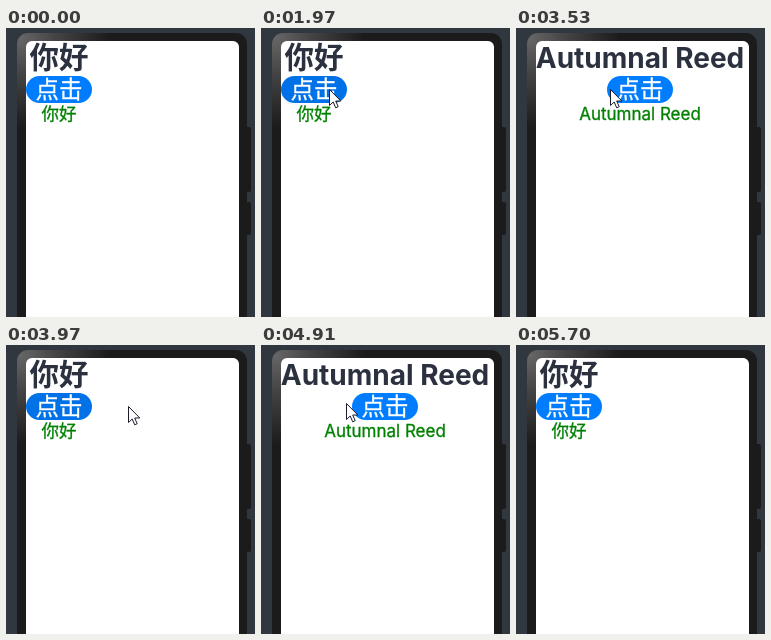
An HTML page that plays this animation: 249x289 px, repeating every 6.6 s.

```html
<!DOCTYPE html>
<html lang="zh-CN">
<head>
<meta charset="utf-8">
<style>
  html, body { margin: 0; width: 100%; height: 100%; overflow: hidden; background: #30373f; }
  svg { display: block; }
  text { text-anchor: middle; stroke-width: .3px; font-family: Inter, "Noto Sans CJK SC", "Noto Sans CJK", sans-serif; }
  #title { font-weight: 700; fill: #2b313f; }
  #caption { fill: #fff; stroke: #fff; }
  #note { fill: #008000; stroke: #008000; }
</style>
</head>
<body>
<svg width="249" height="289">
  <defs>
    <radialGradient id="shine" gradientUnits="userSpaceOnUse" cx="14" cy="10" r="90">
      <stop stop-color="#666"/>
      <stop offset=".4" stop-color="#444"/>
      <stop offset="1" stop-color="#1b1b1b"/>
    </radialGradient>
  </defs>
  <rect x="238" y="99" width="7" height="65" rx="2" fill="#1b1b1b"/>
  <rect x="238" y="174" width="7" height="33" rx="2" fill="#1b1b1b"/>
  <rect x="11" y="5" width="230" height="320" rx="11" fill="url(#shine)"/>
  <rect x="20" y="13" width="213" height="320" rx="6" fill="#fff"/>
  <g id="column">
    <text id="title" y="40"></text>
    <rect id="pill" x="-33" y="48" width="66" height="27" rx="13.5"/>
    <text id="caption" y="69.5" font-size="23.5">点击</text>
    <text id="note" y="92"></text>
  </g>
  <path id="cursor" d="M.5 .5V16.5L4.2 13L6.7 18.8L9.2 17.7L6.7 12H11.8Z" fill="#fff" stroke="#1c1c2c" stroke-linejoin="round"/>
</svg>
<script>
const $ = id => document.getElementById(id);
const LOOP = 6600, PRESS = 100;
const ENTER = 180, LEAVE = 5700;
const clicks = [1970, 2970, 3970, 4730, 5450];

// The pointer eases to each place, arriving at `end`
const moves = [
  { start: ENTER, end: 490, x: 68, y: 65 },
  { start: 610, end: 710, x: 68, y: 61 },
  { start: 3350, end: 3720, x: 122, y: 61 },
  { start: 4020, end: 4480, x: 60, y: 57 },
  { start: 4780, end: 5080, x: 122, y: 59 },
  { start: 5450, end: LEAVE, x: 100, y: 140 },
];

const ease = k => k * k * (3 - 2 * k);

function cursorAt(t) {
  let x = 79, y = 137;
  for (const m of moves) {
    const k = ease(Math.min(1, Math.max(0, (t - m.start) / (m.end - m.start))));
    x += (m.x - x) * k;
    y += (m.y - y) * k;
  }
  return [Math.round(x), Math.round(y)];
}

function setText(id, text, size) {
  $(id).textContent = text;
  $(id).setAttribute('font-size', size);
}

function draw(t) {
  // The first click only presses the button; each later one swaps the language
  const past = clicks.filter(c => c <= t);
  const english = past.length > 0 && past.length % 2 === 0;
  const pressed = t - past.at(-1) < PRESS;
  const text = english ? 'Autumnal Reed' : '你好';

  setText('title', text, english ? 28 : 29.5);
  setText('note', text, english ? 17 : 17.5);
  $('column').setAttribute('transform', `translate(${english ? 124 : 53} 0)`);
  $('pill').setAttribute('fill', pressed ? '#0071e6' : '#007dff');

  $('cursor').setAttribute('visibility', t >= ENTER && t < LEAVE ? 'visible' : 'hidden');
  $('cursor').setAttribute('transform', `translate(${cursorAt(t)})`);
}

const origin = performance.now();
function frame() {
  draw((performance.now() - origin) % LOOP);
  requestAnimationFrame(frame);
}
frame();
</script>
</body>
</html>
```
